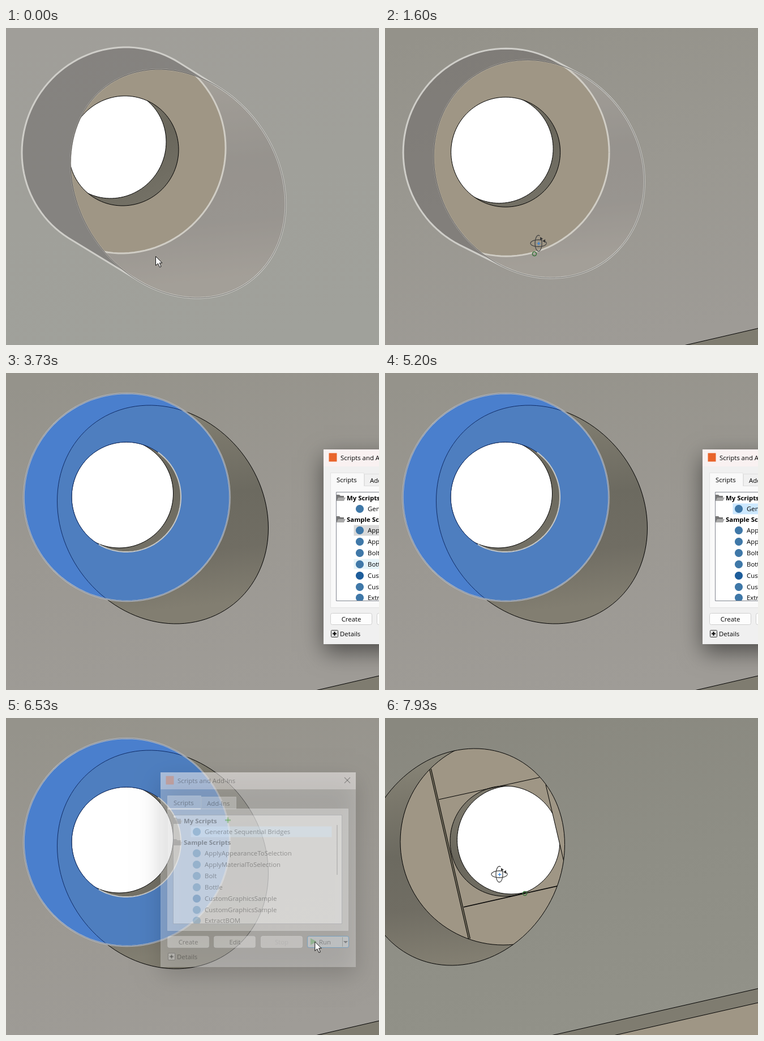
An HTML page with a canvas that plays this animation: 659x560 px, repeating every 8 s.

```html
<!DOCTYPE html>
<html lang="en">
<head>
<meta charset="utf-8">
<title>Counterbore bridges</title>
<style>
html, body { margin: 0; width: 100%; height: 100%; overflow: hidden; background: #98968f; }
canvas { display: block; }
</style>
</head>
<body>
<canvas id="stage" width="659" height="560"></canvas>
<script>
const W = 659, H = 560, LOOP = 8000;
const ctx = document.getElementById('stage').getContext('2d');
const FONT = '"Open Sans", "Noto Sans", sans-serif';

// Ellipses are [cx, cy, half width, half height, skew].
// edges: heights of the plate's two lower edges at the right border, and their slope.
const START = {
  rim: [304, 275, 190, 202, .18], floor: [208, 216, 180, 182, -.022],
  hole: [208, 217, 97, 97, -.022], back: [187.5, 204, 95.5, 97, -.03],
  edges: [610, 690], slope: .234, top: [160, 158, 153], bottom: [160, 161, 155]
};
const LEFT = {
  rim: [172.5, 229, 178.5, 185, -.1], floor: [227.5, 222.5, 181.5, 183.5, 0],
  hole: [226, 222.5, 97, 97.5, 0], back: [236.5, 221.5, 95.5, 97, 0],
  edges: [439, 439], slope: .234, top: [134, 132, 123], bottom: [139, 138, 132]
};
const WORK = {
  rim: [277, 250, 186.5, 193, .125], floor: [213.5, 219.5, 182, 183.5, 0],
  hole: [212.5, 219, 96.5, 97, 0], back: [200, 213, 95.5, 96, 0],
  edges: [535, 610], slope: .231, top: [149, 147, 139], bottom: [159, 156, 151]
};
const RESULT = {
  rim: [138, 245.5, 179.5, 191.5, -.115], floor: [209, 218.5, 182, 182.5, 0],
  hole: [212, 217.5, 97, 97.5, 0], back: [223, 215.5, 95.5, 95.5, 0],
  edges: [478, 503], slope: .227, top: [137, 136, 127], bottom: [146, 146, 137]
};
// Cut lines as [x1, y1, x2, y2, width].
const CUTS_WORK = {
  hole: [209, 217.5, 97, 97.5, 0],
  left: [102, 161, 147, 371, 1], right: [276, 55, 340, 353, 2],
  upper: [111, 141, 284, 103, 1], lower: [139, 333, 324, 292, 2.6]
};
const CUTS_RESULT = {
  hole: RESULT.hole,
  left: [80, 90, 149, 390, 4], right: [284, 118, 334, 330, 1],
  upper: [95, 144, 273, 105, 1], lower: [139, 334, 304, 297, 1.5]
};

const VIEW = [[0, START], [70, START], [600, LEFT], [930, LEFT], [1700, WORK], [7300, WORK], [7930, RESULT]];
const CUTS = [[0, CUTS_WORK], [7300, CUTS_WORK], [7930, CUTS_RESULT]];
const CURSOR = [
  [0, [264, 403]], [70, [264, 400]], [600, [236, 390]], [930, [236, 390]], [1670, [272, 380]],
  [2130, [266, 356]], [3260, [266, 356]], [3650, [700, 340]], [3790, [700, 340]], [4000, [700, 240]],
  [4640, [700, 240]], [4800, [740, 151]], [5200, [740, 151]], [5540, [452, 112]], [5670, [489, 227]],
  [5930, [545, 393]], [6070, [550, 397]], [6470, [550, 397]], [7150, [344, 302]], [7300, [344, 302]],
  [7400, [244, 302]], [7930, [202, 276]]
];
const DIALOG = [[0, [561, 135]], [5200, [561, 135]], [5540, [273, 96]]];

const clamp = v => Math.max(0, Math.min(1, v));
const smooth = v => v * v * (3 - 2 * v);
function mix(a, b, k) {
  if (typeof a === 'number') return a + (b - a) * k;
  if (Array.isArray(a)) return a.map((v, i) => mix(v, b[i], k));
  return Object.fromEntries(Object.keys(a).map(key => [key, mix(a[key], b[key], k)]));
}
function at(keys, t) {
  const next = keys.findIndex(key => key[0] > t);
  if (next < 0) return keys[keys.length - 1][1];
  const [t0, a] = keys[next - 1], [t1, b] = keys[next];
  return mix(a, b, smooth((t - t0) / (t1 - t0)));
}

function ellipsePoints([cx, cy, rx, ry, skew], from = 0, to = 2 * Math.PI) {
  return Array.from({ length: 121 }, (_, i) => {
    const a = from + (to - from) * i / 120;
    return [cx + rx * Math.cos(a), cy + ry * Math.sin(a + skew)];
  });
}
function ellipse(shape, path = new Path2D(), from, to) {
  ellipsePoints(shape, from, to).forEach(([x, y], i) => i ? path.lineTo(x, y) : path.moveTo(x, y));
  return path;
}
function polygon(...points) {
  const path = new Path2D();
  points.forEach(([x, y], i) => i ? path.lineTo(x, y) : path.moveTo(x, y));
  path.closePath();
  return path;
}
function convexHull(points) {
  const chain = list => {
    const out = [];
    for (const p of list) {
      while (out.length > 1) {
        const [a, b] = out.slice(-2);
        if ((b[0] - a[0]) * (p[1] - a[1]) > (b[1] - a[1]) * (p[0] - a[0])) break;
        out.pop();
      }
      out.push(p);
    }
    return out.slice(0, -1);
  };
  const sorted = [...points].sort((p, q) => p[0] - q[0] || p[1] - q[1]);
  return [...chain(sorted), ...chain(sorted.reverse())];
}
function outside(path) {
  const all = new Path2D(path);
  all.rect(-300, -300, W + 600, H + 600);
  return all;
}
function fill(path, color, rule) { ctx.fillStyle = color; ctx.fill(path, rule); }
function stroke(path, color = '#000', width = 1) {
  ctx.strokeStyle = color; ctx.lineWidth = width; ctx.stroke(path);
}
function line(x1, y1, x2, y2, color, width) {
  const path = new Path2D();
  path.moveTo(x1, y1); path.lineTo(x2, y2);
  stroke(path, color, width);
}
function clipped(paths, draw) {
  ctx.save();
  paths.forEach(path => ctx.clip(path, 'evenodd'));
  draw();
  ctx.restore();
}
function gradient(x1, y1, x2, y2, ...colors) {
  const g = ctx.createLinearGradient(x1, y1, x2, y2);
  colors.forEach((c, i) => g.addColorStop(i / (colors.length - 1), c));
  return g;
}
const rgb = c => `rgb(${c.map(Math.round)})`;

function drawPlate(v) {
  ctx.fillStyle = gradient(220, -20, 350, 580, rgb(v.top), rgb(mix(v.top, v.bottom, .6)), rgb(v.bottom));
  ctx.fillRect(0, 0, W, H);
  ['#7f7c70', '#9f9685'].forEach((color, i) => {
    const y = v.edges[i], drop = W * v.slope;
    fill(polygon([0, y + drop], [W, y], [W, 900], [0, 900]), color);
    line(0, y + drop, W, y);
  });
}

function drawCuts(cuts) {
  for (const name of ['upper', 'lower', 'left', 'right']) {
    const [x1, y1, x2, y2, width] = cuts[name];
    line(x1, y1, x2, y2, '#000', width);
    if (width > 2) line(x1, y1, x2, y2, '#77715f', width - 2);
  }
}

function drawBore(v, cuts) {
  const rim = ellipse(v.rim), floor = ellipse(v.floor), back = ellipse(v.back);
  const hole = ellipse(cuts ? cuts.hole : v.hole);
  const [, cy, , ry] = v.rim;
  fill(rim, gradient(0, cy - ry, 40, cy + ry, '#8c897b', '#7a776b', '#6c6a60', '#706d63', '#827e71'));
  clipped([rim, floor], () => {
    fill(floor, '#9f9685');
    const drawHole = () => {
      fill(hole, gradient(150, 120, 240, 315, '#817d70', '#69665b', '#747166'));
      clipped([hole], () => { fill(back, '#fff'); stroke(back); });
      stroke(hole);
    };
    if (cuts) {
      const { left: l, right: r } = cuts;
      clipped([polygon([l[0], l[1]], [r[0], r[1]], [r[2], r[3]], [l[2], l[3]])], drawHole);
      drawCuts(cuts);
    } else drawHole();
  });
  clipped([rim], () => stroke(floor));
  stroke(rim);
}

// Prehighlight of the cylindrical wall: its silhouette shows through the plate.
function drawWallHighlight(v) {
  const rim = ellipse(v.rim), floor = ellipse(v.floor);
  const silhouette = polygon(...convexHull([...ellipsePoints(v.rim), ...ellipsePoints(v.floor)]));
  clipped([outside(rim)], () => fill(silhouette, 'rgba(101,97,95,.45)'));
  clipped([outside(floor)], () => fill(rim, 'rgba(213,208,210,.4)'));
  clipped([rim], () => stroke(floor, '#d0cdc5', 3));
  stroke(rim, 'rgba(212,209,202,.75)', 2);
  stroke(silhouette, '#cfcec9', 3);
  stroke(rim, 'rgba(20,20,20,.7)', .8);
}

function drawFaceHighlight(v, selected) {
  const face = ellipse(v.hole, ellipse(v.floor)), rim = ellipse(v.rim);
  const [outer, inner, edge, rimColor] = selected
    ? ['#4a7fcd', '#4e7ebf', '#c8cac9', '#102c66']
    : ['#80a5da', '#87a5d6', '#e8e8e4', '#4468a8'];
  fill(face, outer, 'evenodd');
  clipped([rim], () => fill(face, inner, 'evenodd'));
  clipped([face], () => stroke(rim, rimColor));
  stroke(ellipse(v.hole), rimColor, 1);
  stroke(ellipse(v.hole, new Path2D(), -.95, 2.1), edge, 2);
  stroke(ellipse(v.floor), edge, 2.5);
  stroke(ellipse(v.floor), rimColor, .5);
}

function drawSegmentHighlight(v) {
  const floor = ellipse(v.floor);
  clipped([polygon([273, 46], [273, 0], [600, 0], [600, 349], [340, 349])], () => {
    fill(floor, 'rgba(214,213,203,.5)');
    stroke(floor, '#c9c9c6', 4);
    stroke(floor, '#666', .7);
  });
  line(274, 47, 340, 349, '#c9c9c6', 4);
  line(276, 60, 338, 346, '#444', .8);
}

function text(s, x, y, { color = '#000', bold = false, center = false } = {}) {
  ctx.font = `${bold ? 'bold ' : ''}11.4px ${FONT}`;
  ctx.fillStyle = color;
  ctx.textAlign = center ? 'center' : 'left';
  ctx.fillText(s, x, y);
}
function box(x, y, w, h, color, border, radius = 0) {
  const path = new Path2D();
  path.roundRect(x + .5, y + .5, w - 1, h - 1, radius);
  fill(path, color);
  if (border) stroke(path, border);
}
function disc(x, y, r, color) { fill(ellipse([x, y, r, r, 0]), color); }

const ROWS = [
  ['My Scripts', 86], ['Generate Sequential Bridges', 105], ['Sample Scripts', 124],
  ['ApplyAppearanceToSelection', 143], ['ApplyMaterialToSelection', 163], ['Bolt', 183],
  ['Bottle', 203], ['CustomGraphicsSample', 223], ['CustomGraphicsSample', 243], ['ExtractBOM', 262]
];

function drawRows(mx, my, t) {
  const selected = t < 4200 ? 3 : 1;
  ROWS.forEach(([label, y], i) => {
    const group = i === 0 || i === 2;
    const hover = mx > 39 && mx < 303 && Math.abs(my - y) < 9.6;
    const x = group ? 39 : 53;
    if (i === selected) box(x, y - 10, 303 - x, 20, t < 4200 ? '#d9d9d9' : '#cce8ff');
    else if (hover) box(x, y - 10, 303 - x, 19, '#e5f3f8');
    if (group) {
      fill(polygon([23, y - 6], [28, y - 6], [30, y - 4], [36, y - 4], [36, y + 5], [23, y + 5]), '#777');
      fill(polygon([26, y - 1], [39, y - 1], [36, y + 5], [23, y + 5]), '#a9a9a9');
    } else disc(64, y, 7, i === 7 ? '#1d5d9b' : '#3f78a8');
    text(label, group ? 41 : 78, y + 4, { bold: group });
  });
  ctx.fillStyle = '#36992c';
  ctx.fillRect(114, 83, 10, 3);
  ctx.fillRect(117.5, 79.5, 3, 10);
}

function drawDialog(t, cursor) {
  const [dx, dy] = at(DIALOG, t), mx = cursor[0] - dx, my = cursor[1] - dy;
  ctx.save();
  ctx.globalAlpha = Math.min(clamp((t - 3400) / 130), clamp((6560 - t) / 90));
  ctx.translate(Math.round(dx), Math.round(dy));
  ctx.save();
  ctx.shadowColor = 'rgba(0,0,0,.5)';
  ctx.shadowBlur = 38;
  ctx.shadowOffsetY = 14;
  ctx.fillStyle = '#f0f0f0';
  ctx.fillRect(0, 0, 345, 344);
  ctx.restore();
  ctx.fillStyle = '#f9f1f1';
  ctx.fillRect(0, 0, 345, 30);
  box(9, 6, 15, 16, '#e9642b');
  text('Scripts and Add-Ins', 30, 19);
  line(325, 9, 335, 19, '#111', 1.1);
  line(335, 9, 325, 19, '#111', 1.1);

  box(12, 64, 320, 216, '#f9f9f9', '#e3e3e3');
  const overTab = mx > 72 && mx < 200 && my > 44 && my < 64;
  box(72, 43, 62, 22, overTab ? '#f6f6f6' : '#f0f0f0', '#dedede');
  box(12, 41, 60, 24, '#f9f9f9', '#e3e3e3');
  ctx.fillStyle = '#f9f9f9';
  ctx.fillRect(13, 63, 58, 3);
  text('Scripts', 23, 58);
  text('Add-Ins', 82, 59);

  box(22, 75, 299, 193, '#fff', '#828790');
  const list = new Path2D();
  list.rect(23, 76, 297, 191);
  clipped([list], () => drawRows(mx, my, t));
  ctx.fillStyle = '#868686';
  ctx.fillRect(311, 93, 2, 88);

  ['Create', 'Edit', 'Stop'].forEach((label, i) => {
    const off = i === 2, x = 12 + 82.5 * i;
    box(Math.floor(x), 289, 74, 21, off ? '#f4f4f4' : '#fdfdfd', off ? '#e4e4e4' : '#cfcfcf', 3);
    text(label, x + 37, 304, { center: true, color: off ? '#a0a0a0' : '#000' });
  });
  const overRun = mx > 259 && mx < 333 && my > 289 && my < 310;
  const runColor = t > 6200 && t < 6330 ? '#cce4f7' : overRun ? '#e5f1fb' : '#fdfdfd';
  box(259, 289, 74, 21, runColor, overRun ? '#0078d4' : '#cfcfcf', 3);
  fill(polygon([265, 293], [276, 299], [265, 305]), '#3f9b35');
  text('Run', 280, 304);
  line(321.5, 291, 321.5, 308, '#555');
  fill(polygon([323, 298], [331, 298], [327, 302]), '#000');

  box(13, 319, 13, 13, '#e6e6e6', '#333', 1);
  line(16, 325.5, 23, 325.5, '#000', 2);
  line(19.5, 322, 19.5, 329, '#000', 2);
  text('Details', 29, 330);
  ctx.restore();
}

function drawArrow(x, y) {
  const path = polygon(...[[0, 0], [0, 16], [4, 12.5], [7, 19], [9.5, 18], [6.8, 11.5], [11.5, 11.5]]
    .map(([px, py]) => [x + px + .5, y + py + .5]));
  fill(path, '#fff');
  stroke(path, '#111', 1);
}
function drawOrbit(x, y, pivot) {
  stroke(ellipse([...pivot, 3.5, 3.5, 0]), '#39723a', 1.5);
  stroke(ellipse([x, y, 6, 14, 0], new Path2D(), -.8, 5.1), '#444', 1.3);
  stroke(ellipse([x, y, 14, 6, 0], new Path2D(), -.5, 5.2), '#444', 1.3);
  fill(polygon([x + 3, y - 11], [x + 8, y - 8], [x + 3, y - 6]), '#333');
  fill(polygon([x + 7, y - 4], [x + 12, y - 7], [x + 12, y - 1]), '#333');
  line(x - 2.5, y + .5, x + 3.5, y + .5, '#2d82e0', 1.2);
  line(x + .5, y - 2.5, x + .5, y + 3.5, '#2d82e0', 1.2);
}

function draw(t) {
  const view = at(VIEW, t), cursor = at(CURSOR, t);
  const built = t >= 6670;
  drawPlate(view);
  drawBore(view, built && at(CUTS, t));
  if (t < 1930) drawWallHighlight(view);
  if (t >= 2330 && !built) drawFaceHighlight(view, t >= 3200);
  if (t >= 7070 && t < 7330) drawSegmentHighlight(view);
  if (t >= 3400 && t < 6560) drawDialog(t, cursor);
  if (t >= 70 && t < 1700) drawOrbit(...cursor, [264, 399]);
  else if (t >= 7400) drawOrbit(...cursor, [247, 310]);
  else drawArrow(...cursor);
}

const begin = performance.now();
function tick() {
  draw((performance.now() - begin) % LOOP);
  requestAnimationFrame(tick);
}
tick();
</script>
</body>
</html>
```
